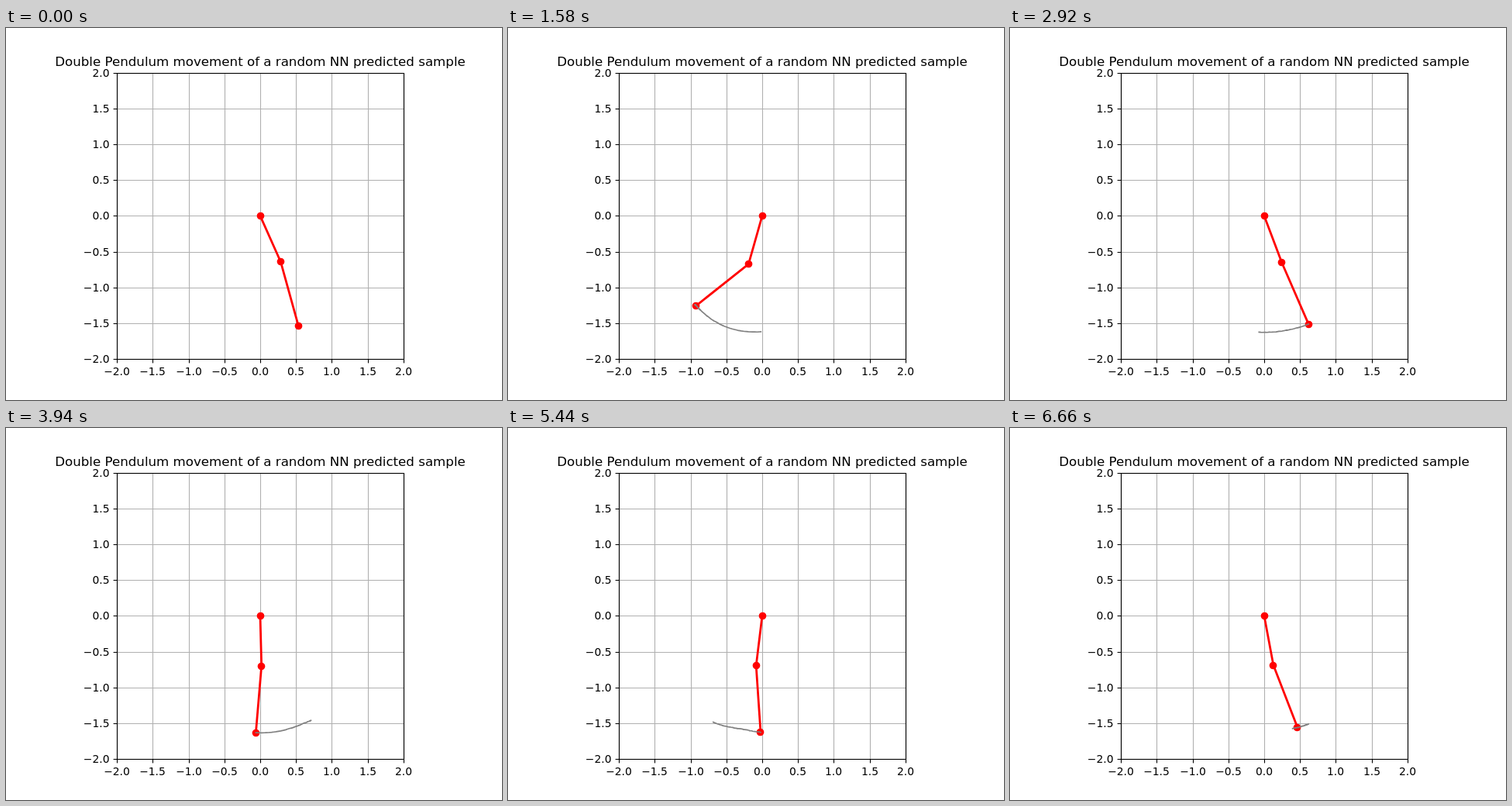
An HTML page for the animation above (6680 ms loop, 640x480 px).

```html
<!DOCTYPE html>
<html lang="en">
<head>
<meta charset="utf-8">
<title>Double pendulum</title>
<style>
  html, body { margin: 0; width: 100%; height: 100%; overflow: hidden; background: #fff; }
  svg { display: block; width: 640px; height: 480px; }
  text { font: 13.89px "DejaVu Sans", sans-serif; fill: #000; }
  .title { font-size: 16.67px; text-anchor: middle; }
  .grid { stroke: #b0b0b0; stroke-width: 1.11; }
  .axis { stroke: #000; stroke-width: 1.11; fill: none; }
  .rod { stroke: #f00; stroke-width: 2.78; stroke-linejoin: round; fill: none; }
  .ball { fill: #f00; }
  .trail { stroke: #808080; stroke-width: 1.7; stroke-linejoin: round; stroke-linecap: square; fill: none; }
</style>
</head>
<body>
<svg viewBox="0 0 640 480"></svg>
<script>
const STEP = 20, COUNT = 334, TRAIL = 34;
const PIVOT = { x: 328, y: 242.4 }, UPPER = 64.7, LOWER = 86.3;

const svg = document.querySelector("svg");

function add(tag, attrs, text) {
  const el = document.createElementNS("http://www.w3.org/2000/svg", tag);
  for (const name in attrs) el.setAttribute(name, attrs[name]);
  if (text) el.textContent = text;
  return svg.appendChild(el);
}

const line = (cls, x1, y1, x2, y2) => add("line", { class: cls, x1, y1, x2, y2 });

function drawAxes() {
  const snap = v => Math.round(v) + .5;
  const ticks = Array.from({ length: 9 }, (_, i) => ({
    x: snap(143.2 + 46.2 * i),
    y: snap(427.2 - 46.2 * i),
    label: ((i - 4) / 2).toFixed(1).replace("-", "\u2212")
  }));
  for (const { x, y } of ticks) {
    line("grid", x, 58.5, x, 427.5);
    line("grid", 143.5, y, 513.5, y);
  }
  for (const { x, y, label } of ticks) {
    line("axis", x, 427.5, x, 432.4);
    line("axis", 138.6, y, 143.5, y);
    add("text", { x: x - .5, y: 448, "text-anchor": "middle" }, label);
    add("text", { x: 133.5, y: y + 4.5, "text-anchor": "end" }, label);
  }
  add("text", { class: "title", x: 328, y: 49 },
    "Double Pendulum movement of a random NN predicted sample");
}

const wave = (t, size, period, peak) => size * Math.cos(2 * Math.PI * (t - peak) / period);

// Repeatable noise from -1 to 1
function noise(n) {
  const v = Math.sin(n * 12.9898) * 43758.5453;
  return 2 * (v - Math.floor(v)) - 1;
}

// Pivot, elbow and tip: a slow swing, a faster wobble and the jitter of a prediction
function pose(k) {
  const t = k * STEP / 1000;
  const swing = wave(t, 67, 3.06, .085) - wave(t, 10, 1.47, 0)
    + wave(t, 7, 2.22, .5) - wave(t, 5, 6.4, 0) - 3;
  const bend = wave(t, .13, 1.47, -.03) + wave(t, .11, 2.3, -.575);
  const upper = swing / 175 + bend + .012 * noise(k + 1);
  const reach = swing + 1.5 * noise(k + 500);
  const elbow = { x: PIVOT.x + UPPER * Math.sin(upper), y: PIVOT.y + UPPER * Math.cos(upper) };
  const tipX = PIVOT.x + reach;
  const tip = { x: tipX, y: elbow.y + Math.sqrt(LOWER ** 2 - (tipX - elbow.x) ** 2) };
  return [PIVOT, elbow, tip];
}

drawAxes();
const rod = add("polyline", { class: "rod" });
const balls = [0, 1, 2].map(() => add("circle", { class: "ball", r: 4.86 }));
const trail = add("polyline", { class: "trail" });
add("rect", { class: "axis", x: 143.5, y: 58.5, width: 370, height: 369 });

const poses = Array.from({ length: COUNT }, (_, k) => pose(k));
const points = list => list.map(p => p.x.toFixed(2) + "," + p.y.toFixed(2)).join(" ");

function show(k) {
  const joints = poses[k];
  rod.setAttribute("points", points(joints));
  balls.forEach((ball, i) => {
    ball.setAttribute("cx", Math.floor(joints[i].x) + .5);
    ball.setAttribute("cy", Math.floor(joints[i].y) + .5);
  });
  const past = poses.slice(Math.max(0, k - TRAIL), k + 1).map(p => p[2]);
  trail.setAttribute("points", k ? points(past) : "");
}

const start = performance.now();
function tick() {
  show(Math.floor((performance.now() - start) / STEP) % COUNT);
  requestAnimationFrame(tick);
}
tick();
</script>
</body>
</html>
```
